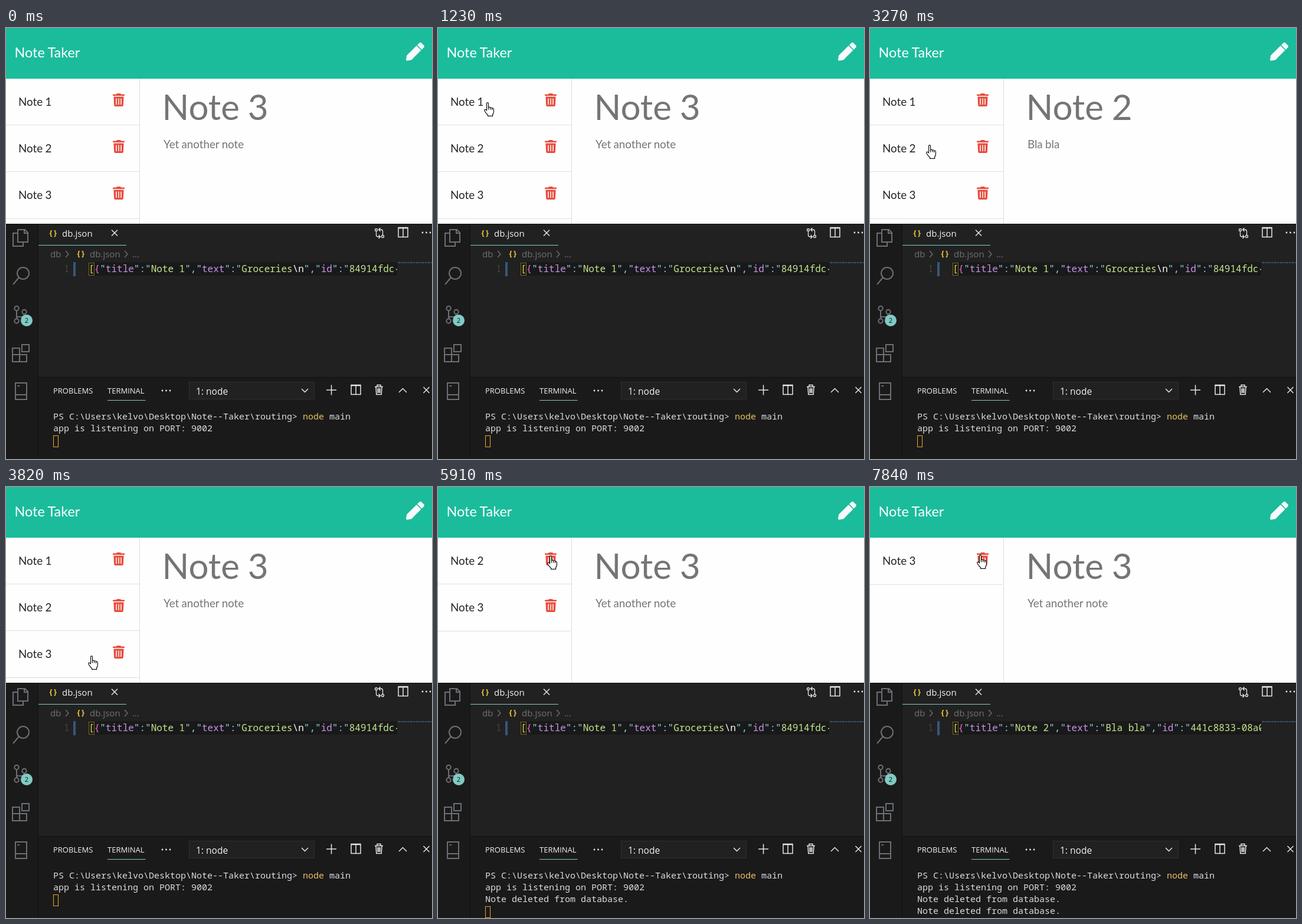
An HTML page for the animation above (8 s loop, 722 by 731 pixels).

```html
<!DOCTYPE html>
<html lang="en">
<head>
<meta charset="utf-8">
<title>Note Taker</title>
<style>
  html, body { margin: 0; width: 100%; height: 100%; overflow: hidden; background: #212121; }
  svg { display: block; }
  text { white-space: pre; }

  .lato { font-family: Lato, sans-serif; font-size: 18.75px; word-spacing: -.025em; fill: #212529; }
  .ui { font-family: "Open Sans", sans-serif; font-size: 15px; fill: #f2f2f2; }
  .code { font-family: "Noto Sans Mono", monospace; font-size: 16px; font-weight: 500; fill: #c3e88d; }
  .term { font-family: "Noto Sans Mono", monospace; font-size: 15px; font-weight: 500; fill: #dcdcdc; }
  .heading { font-size: 60px; word-spacing: -1.5px; }
  .note { fill: #757575; }
  .dim { fill: #727272; }
  .q { fill: #89ddff; }
  .k { fill: #c792ea; }
  .line { fill: none; stroke: #dfdfdf; }
  .icon { fill: none; stroke: #e6e6e6; stroke-width: 1.5; }
  .side { fill: none; stroke: #6b7072; stroke-width: 2; }

  .anim { animation: 8s step-end infinite; }
  .first { animation-name: first; }
  .second { animation-name: second; }
  .third { animation-name: third; }
  .list { animation-name: list; }
  .before { animation-name: before; }
  .after { animation-name: after; }
  .scroll { animation-name: scroll; }
  .log1 { animation-name: log1; }
  .log2 { animation-name: log2; }
  .caret { animation-name: caret; }
  .click { animation-name: click; }
  .pointer { animation-name: pointer; }

  @keyframes first { 0%, 34%, 100% { opacity: 0 } 18.375% { opacity: 1 } }
  @keyframes second { 0%, 47.75%, 100% { opacity: 0 } 34% { opacity: 1 } }
  @keyframes third { 0%, 47.75%, 100% { opacity: 1 } 18.375% { opacity: 0 } }
  @keyframes list {
    0% { transform: translateY(0) }
    72.875% { transform: translateY(-79px) }
    98%, 100% { transform: translateY(-158px) }
  }
  @keyframes before { 0% { opacity: 1 } 76%, 100% { opacity: 0 } }
  @keyframes after { 0% { opacity: 0 } 76%, 100% { opacity: 1 } }
  @keyframes scroll { 0%, 98%, 100% { opacity: 0 } 76% { opacity: 1 } }
  @keyframes log1 { 0% { opacity: 0 } 72.875%, 100% { opacity: 1 } }
  @keyframes log2 { 0% { opacity: 0 } 98%, 100% { opacity: 1 } }
  @keyframes caret {
    0% { transform: translateY(0) }
    72.875% { transform: translateY(20px) }
    98%, 100% { transform: translateY(40px) }
  }
  @keyframes click {
    0%, 18.375%, 34%, 47.75%, 72.875%, 98%, 100% { opacity: 0 }
    17.25%, 33.125%, 46.75%, 72%, 96.125% { opacity: .47 }
  }
  @keyframes pointer {
    0% { transform: translate(-60px, -60px) }
    1.625% { transform: translate(601px, 707px); animation-timing-function: steps(10) }
    11.625% { transform: translate(76px, 99px) }
    12.625% { transform: translate(74px, 106px); animation-timing-function: steps(3) }
    15.375% { transform: translate(78px, 126px) }
    25.125% { transform: translate(84px, 143px); animation-timing-function: steps(2) }
    27% { transform: translate(96px, 184px) }
    29.125% { transform: translate(94px, 192px); animation-timing-function: steps(2) }
    31% { transform: translate(92px, 196px) }
    40.875% { transform: translate(95px, 198px); animation-timing-function: steps(2) }
    42.75% { transform: translate(141px, 286px) }
    44.875% { transform: translate(139px, 286px) }
    60.625% { transform: translate(150px, 272px); animation-timing-function: steps(4) }
    64.25% { transform: translate(261px, 98px); animation-timing-function: steps(2) }
    66.125% { transform: translate(213px, 108px); animation-timing-function: steps(2) }
    68% { transform: translate(185px, 116px) }
    85.625% { transform: translate(187px, 135px); animation-timing-function: steps(3) }
    88.5% { transform: translate(187px, 168px) }
    90.375% { transform: translate(186px, 156px); animation-timing-function: steps(4) }
    94.25%, 100% { transform: translate(181px, 115px) }
  }
</style>
</head>
<body>
<svg width="722" height="731" viewBox="0 0 722 731">
  <defs>
    <g id="trash">
      <path fill="#e74c3c" d="M0 2.2Q0 1.5.8 1.5H5.5L6.6.4Q7 0 7.6 0H12.4Q13 0 13.4.4L14.5 1.5H19.2Q20 1.5 20 2.2V4H0ZM1.4 5.5H18.6L17.8 20Q17.6 22 15.7 22H4.3Q2.4 22 2.2 20Z"/>
      <path stroke="#fff" stroke-width="1.5" stroke-linecap="round" d="M6 9V18.5M10 9V18.5M14 9V18.5"/>
    </g>
    <path id="split" class="icon" d="M0 0H16V16H0ZM8 0V16M0 1H16"/>
    <path id="cross" class="icon" d="M0 0L10 10M10 0L0 10"/>
    <g id="dots" fill="#e6e6e6"><circle r="1.4"/><circle cx="6.5" r="1.4"/><circle cx="13" r="1.4"/></g>
    <text id="braces" class="code" style="font-size:13px;font-weight:700;fill:#e8c84a">{}</text>
    <clipPath id="editor"><rect x="120" y="390" width="543" height="202"/></clipPath>
  </defs>

  <!-- Notes page -->
  <rect width="722" height="332" fill="#fefefe"/>
  <path class="line" d="M226.5 86V332"/>
  <g class="anim list lato">
    <path class="line" d="M0 164.5H226M0 243.5H226M0 323.5H222Q226.5 323.5 226.5 319"/>
    <text x="21" y="132">Note 1</text><use href="#trash" x="181" y="111"/>
    <text x="21" y="211">Note 2</text><use href="#trash" x="181" y="190"/>
    <text x="21" y="290">Note 3</text><use href="#trash" x="181" y="269"/>
  </g>
  <g class="lato">
    <g class="anim first">
      <text class="heading note" x="264.5" y="156">Note 1</text>
      <text class="note" x="267" y="204">Groceries</text>
    </g>
    <g class="anim second">
      <text class="heading note" x="264.5" y="156">Note 2</text>
      <text class="note" x="267" y="204">Bla bla</text>
    </g>
    <g class="anim third">
      <text class="heading note" x="264.5" y="156">Note 3</text>
      <text class="note" x="267" y="204">Yet another note</text>
    </g>
  </g>
  <rect width="722" height="86" fill="#1abc9c"/>
  <text class="lato" x="14.5" y="49.5" style="font-size:23.4px;fill:#fff">Note Taker</text>
  <path transform="translate(678 24.5) scale(.97)" fill="#f8f9fa" d="M31 9l-3 3q-.5.5-1 0l-7-7q-.5-.5 0-1l3-3q2-2 4 0l4 4q2 2 0 4zM17.8 6.2L1.3 22.6 0 30.2Q0 32 1.8 32l7.6-1.3L25.8 14.2q.5-.5 0-1l-7-7q-.5-.5-1 0z"/>

  <!-- Code editor -->
  <rect y="332" width="722" height="399" fill="#212121"/>
  <rect y="332" width="55" height="399" fill="#1b1a1b"/>
  <rect x="55" y="592" width="667" height="139" fill="#1b1a1b"/>
  <path stroke="#111" d="M0 332.5H722M54.5 332V731M55 592.5H722"/>

  <g class="side">
    <path d="M20 342H32L37 347V363H20ZM31 342V348H37M20 348H12V370H29V363"/>
    <circle cx="29" cy="416" r="10"/><path d="M22 423L12 435"/>
    <circle cx="18" cy="475.5" r="3.7"/><circle cx="31" cy="481.5" r="3.7"/><circle cx="18" cy="497" r="3.7"/>
    <path d="M18 479V493M31 485Q31 490 25 490H18"/>
    <path d="M11 543H23V554H35V566H11ZM11 554H23V566M27 537H39V549H27Z"/>
    <path d="M16 602H35V630H16ZM16 622H35M19.5 607H23"/>
  </g>
  <circle cx="35" cy="496" r="10" fill="#80cbc4"/>
  <text class="ui" x="35" y="500" text-anchor="middle" style="font-size:11px;fill:#111">2</text>

  <use href="#braces" x="72" y="352"/>
  <text class="ui" x="95" y="354">db.json</text>
  <use href="#cross" x="179" y="342.5"/>
  <path stroke="#80cbc4" d="M55 368.5H204"/>
  <g class="icon" style="stroke-width:1.3">
    <circle cx="627.5" cy="342.5" r="2"/><circle cx="638.5" cy="353.5" r="2"/>
    <path d="M627.5 345V351Q627.5 354 630.5 354H634M631.5 351L634.5 354L631.5 357M638.5 351V345Q638.5 342 635.5 342H632M634.5 339L631.5 342L634.5 345"/>
  </g>
  <use href="#split" x="665" y="338.5"/>
  <use href="#dots" x="706" y="347"/>

  <g class="ui">
    <text class="dim" x="75" y="389">db</text>
    <text class="dim" x="142" y="389">db.json</text>
    <text class="dim" x="214" y="389">...</text>
    <path fill="none" stroke="#727272" stroke-width="1.3" d="M101 378L106 383.5L101 389M201 378L206 383.5L201 389"/>
  </g>
  <use href="#braces" x="119" y="387"/>

  <rect x="140" y="397" width="523" height="23" fill="#191919"/>
  <rect x="114" y="397" width="4" height="24" fill="#34597a"/>
  <text class="code" x="98" y="414" style="fill:#424242">1</text>
  <rect x="140.5" y="398.5" width="9" height="21" fill="none" stroke="#75662c"/>
  <g class="code" clip-path="url(#editor)">
    <text x="140" y="414"><tspan fill="#f5cf45">[</tspan><tspan fill="#da70d6">{</tspan><tspan class="q">"</tspan><tspan class="k">title</tspan><tspan class="q">":"</tspan>Note</text>
    <g class="anim before">
      <text x="293.6" y="414">1<tspan class="q">","</tspan><tspan class="k">text</tspan><tspan class="q">":"</tspan>Groceries<tspan fill="#fff">\n</tspan><tspan class="q">","</tspan><tspan class="k">id</tspan><tspan class="q">":"</tspan>84914fdc-</text>
    </g>
    <g class="anim after">
      <text x="293.6" y="414">2<tspan class="q">","</tspan><tspan class="k">text</tspan><tspan class="q">":"</tspan>Bla bla<tspan class="q">","</tspan><tspan class="k">id</tspan><tspan class="q">":"</tspan>441c8833-08a0</text>
    </g>
  </g>
  <path stroke="#3d6380" stroke-width="1.5" stroke-dasharray="5 1 3 1" d="M664 398H722"/>
  <rect class="anim scroll" x="140" y="579" width="168" height="13" fill="#353535"/>

  <!-- Terminal panel -->
  <g class="ui" style="font-size:13px">
    <text x="80" y="620">PROBLEMS</text>
    <text x="172" y="620">TERMINAL</text>
  </g>
  <path stroke="#80cbc4" d="M172 631.5H236.5"/>
  <use href="#dots" x="265" y="615"/>
  <rect x="310.5" y="600.5" width="212" height="29" fill="#212121" stroke="#303030"/>
  <text class="ui" x="322" y="621.5" style="font-size:15.5px">1: node</text>
  <g class="icon">
    <path d="M501 612L506.5 617.5L512 612M543 614H560M551.5 605.5V622.5M666 618L672.5 611.5L679 618"/>
    <path d="M625 608.5H639M629 608V605.5H635V608M627 609L627.8 621.5H636.2L637 609M630 611V619M632 611V619M634 611V619"/>
  </g>
  <use href="#split" x="585" y="605.5"/>
  <use href="#cross" x="707.5" y="609"/>

  <g class="term">
    <text x="80" y="664">PS C:\Users\kelvo\Desktop\Note--Taker\routing&gt; <tspan fill="#e9c25f">node</tspan> main</text>
    <text x="80" y="684">app is listening on PORT: 9002</text>
    <text class="anim log1" x="80" y="704">Note deleted from database.</text>
    <text class="anim log2" x="80" y="724">Note deleted from database.</text>
    <rect class="anim caret" x="80.5" y="691.5" width="8" height="19" fill="none" stroke="#e5a92c"/>
  </g>

  <g class="anim pointer">
    <circle class="anim click" cx="6" cy="1" r="15" fill="#ff0"/>
    <path fill="#fff" stroke="#111" stroke-width="1.2" stroke-linejoin="round" d="M4.5 14V2.2Q4.5.6 6 .6T7.5 2.2V8.5Q9.5 7.3 10.6 9Q12.6 8.2 13.5 10Q16.4 9.5 16.4 12.5V16Q16.4 18.5 14.6 20.5V23.4H6.5V21.5Q3 18.5.9 14.5Q.2 11.8 2.2 12Q3.5 12.5 4.5 14ZM7.5 8.5V12.5M10.6 9V12.5M13.5 10V13"/>
  </g>
</svg>
</body>
</html>
```
